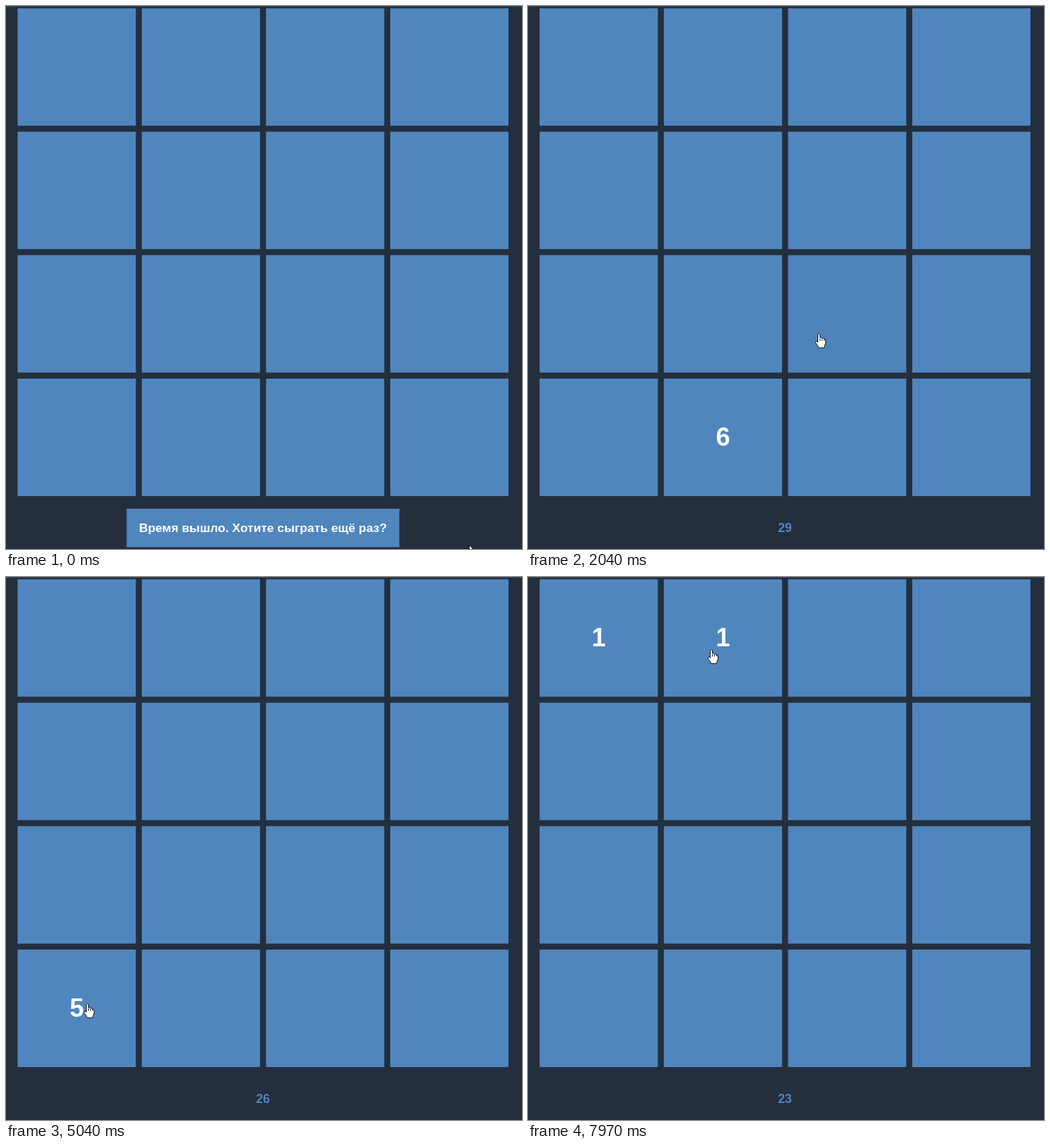
These frames come from a looping animation (729 px wide and 768 px high, 7.99 s). An HTML page with a canvas:

```html
<!DOCTYPE html>
<html lang="ru">
<head>
<meta charset="utf-8">
<title>Игра в пары</title>
<style>
html, body { margin: 0; width: 100%; height: 100%; overflow: hidden; background: #232f3d; }
canvas { display: block; }
</style>
</head>
<body>
<canvas id="stage" width="729" height="768"></canvas>
<script>
const ctx = document.getElementById('stage').getContext('2d');
const LOOP = 7990, START = 520, FADE = 190;
const BG = '#232f3d', BLUE = '#5086be', HOVER = '#4d83b8';
const FONT = '"Liberation Sans", Arial, sans-serif';
const grid = { x: 16.4, y: 3.2, stepX: 175.5, stepY: 174.6, w: 167, h: 166.1 };
const button = { x: 170.4, y: 711, w: 385.3, h: 54.4 };
const CENTER = 363, BASE = 743.7;

// Pointer strokes: start, end, and the point reached
const home = { x: 654, y: 762 };
const strokes = [
  [30, 310, 428, 728],
  [510, 620, 426, 723],
  [990, 1290, 311, 604],
  [1290, 1440, 300, 570],
  [1600, 1780, 372, 566],
  [1800, 2100, 415, 452],
  [2200, 2570, 307, 452],
  [2600, 2780, 292, 448],
  [3200, 3940, 88, 445],
  [4020, 4530, 115, 603],
  [5040, 5640, 165, 233],
  [5640, 5970, 147, 245],
  [5970, 6560, 108, 66],
  [6560, 6730, 112, 76],
  [7160, 7580, 261, 80],
  [7740, 7970, 259, 102]
];

const clamp = u => Math.max(0, Math.min(1, u));
const ease = u => u * u * (3 - 2 * u);

function pointerAt(t) {
  let { x, y } = home;
  for (const [from, to, tx, ty] of strokes) {
    const k = ease(clamp((t - from) / (to - from)));
    x += (tx - x) * k;
    y += (ty - y) * k;
  }
  return { x: Math.round(x), y: Math.round(y) };
}

const inside = (p, r) => p.x >= r.x && p.x < r.x + r.w && p.y >= r.y && p.y < r.y + r.h;

const tiles = Array.from({ length: 16 }, (_, i) => ({
  x: grid.x + (i % 4) * grid.stepX,
  y: grid.y + Math.floor(i / 4) * grid.stepY,
  w: grid.w,
  h: grid.h
}));

// A click opens the tile under the pointer; the next pair closes this one
const clicks = [[1480, 6], [2080, 8], [2510, 7], [3700, 4], [4330, 5], [5620, 2], [6530, 1], [7440, 1]];
const cards = clicks.map(([open, value], i) => {
  const next = clicks[i - i % 2 + 2];
  const spot = pointerAt(open);
  return { open, value, close: next ? next[0] : LOOP, tile: tiles.find(r => inside(spot, r)) };
});

function label(text, x, y, size, color) {
  ctx.font = `bold ${size}px ${FONT}`;
  ctx.textAlign = 'center';
  ctx.fillStyle = color;
  ctx.fillText(text, x, y);
}

function box(r, color) {
  ctx.fillStyle = color;
  ctx.fillRect(r.x, r.y, r.w, r.h);
}

function outline(path) {
  const p = new Path2D(path);
  ctx.fillStyle = '#fff';
  ctx.strokeStyle = '#10151c';
  ctx.lineWidth = 1;
  ctx.lineJoin = 'round';
  ctx.fill(p);
  ctx.stroke(p);
}

function arrow() {
  outline('M.5 .5V16.5L4 13L6.5 18.5L8.8 17.5L6.4 12H11.5Z');
}

function hand() {
  outline('M-1.5 1.5Q0 -.5 1.5 1.5V6H3.5L4.5 7H6.5L7.5 8L9 8.5L9.5 10V14L8 17.5L7.5 20.5H-.5L-1 18.5L-4.5 13.5V11.5L-3 11L-1.5 12.5Z');
  for (const x of [1.5, 4.5, 7.5]) outline(`M${x} ${7 + x / 8}V10.5`);
}

function draw(t) {
  const ptr = pointerAt(t);
  let link = false;
  box({ x: 0, y: 0, w: 729, h: 768 }, BG);
  box({ x: 0, y: 0, w: 729, h: 2 }, '#343f50');
  box({ x: 0, y: 2, w: 729, h: 1 }, '#1a222d');

  for (const tile of tiles) {
    const over = inside(ptr, tile);
    const card = cards.find(c => c.tile === tile && t >= c.open && t < c.close);
    link = link || over;
    box(tile, over && !card ? HOVER : BLUE);
    if (!card) continue;
    ctx.globalAlpha = clamp((t - card.open) / FADE);
    label(card.value, tile.x + tile.w / 2, tile.y + tile.h / 2 + 12.1, 36, '#fff');
    ctx.globalAlpha = 1;
  }

  if (t >= START) {
    label(30 - Math.floor((t - START) / 1000), CENTER, BASE, 17.5, BLUE);
  } else {
    link = inside(ptr, button);
    box(button, BLUE);
    label('Время вышло. Хотите сыграть ещё раз?', CENTER, BASE, 17.4, '#fff');
  }

  ctx.save();
  ctx.translate(ptr.x, ptr.y);
  link ? hand() : arrow();
  ctx.restore();
}

const begin = performance.now();
function tick() {
  draw((performance.now() - begin) % LOOP);
  requestAnimationFrame(tick);
}
tick();
</script>
</body>
</html>
```
